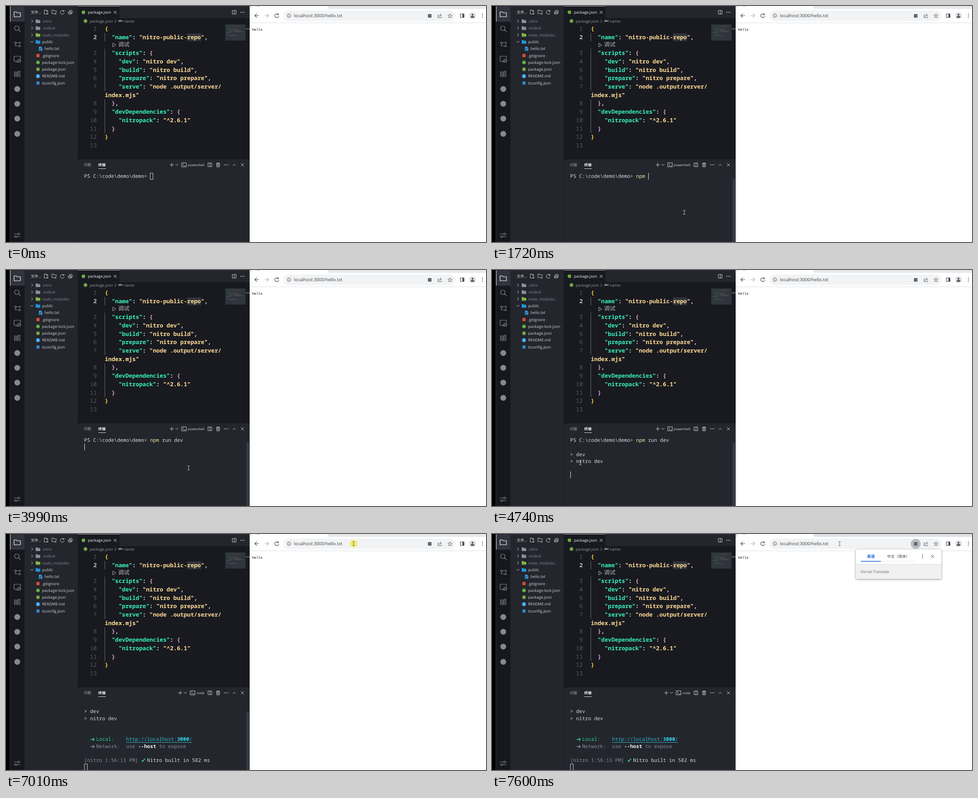
Recreate the animation shown at these times as an HTML page with a canvas. Size 1066 px wide and 526 px high, loop 8 s.

```html
<!DOCTYPE html>
<html lang="zh">
<head>
<meta charset="utf-8">
<title>Editor and browser</title>
<style>
html, body { margin: 0; width: 100%; height: 100%; overflow: hidden; background: #fff; }
canvas { display: block; width: 1066px; height: 526px; }
</style>
</head>
<body>
<canvas id="stage" width="1066" height="526"></canvas>
<script>
const g = document.getElementById('stage').getContext('2d');
g.textRendering = 'geometricPrecision';
g.lineCap = g.lineJoin = 'round';

const UI = '"Open Sans", "Noto Sans CJK SC", "Noto Sans CJK", sans-serif';
const MONO = '"Noto Sans Mono", "DejaVu Sans Mono", monospace';
const LOOP = 8000;
const CODE = 7.62, CELL = 6.66, ROW = 15.57;

// ---- drawing helpers; text is placed by its vertical centre ----
function text(s, x, y, size, color, { font = UI, weight = 400, align = 'left' } = {}) {
  g.font = `${weight} ${size}px ${font}`;
  g.textAlign = align;
  g.fillStyle = color;
  g.fillText(s, x, y + size * 0.35);
}
function rect(x, y, w, h, color, radius = 0) {
  g.fillStyle = color;
  g.beginPath();
  g.roundRect(x, y, w, h, radius);
  g.fill();
}
function disc(x, y, r, color) {
  g.fillStyle = color;
  g.beginPath();
  g.arc(x, y, r, 0, 7);
  g.fill();
}
function icon(d, x, y, color, width = 1, fill) {
  const path = new Path2D(d);
  g.save();
  g.translate(x, y);
  if (fill) { g.fillStyle = fill; g.fill(path); }
  if (color) { g.strokeStyle = color; g.lineWidth = width; g.stroke(path); }
  g.restore();
}
function dots(x, y, dx, dy, color) {
  for (const k of [-1, 0, 1]) disc(x + k * dx, y + k * dy, 1, color);
}

const I = {
  cross: 'M-3-3L3 3M3-3L-3 3',
  right: 'M-1.5-3L1.5 0L-1.5 3',
  down: 'M-3-1.5L0 1.5L3-1.5',
  up: 'M-3 1.5L0-1.5L3 1.5',
  plus: 'M-4 0H4M0-4V4',
  split: 'M-4-4H4V4H-4ZM0-4V4',
  folder: 'M-5-4H-1L0-2.5H5V4H-5Z',
  file: 'M-3.5-4.5H1.5L4-2V4.5H-3.5Z',
  search: 'M4-1.5A5 5 0 1 1-6-1.5A5 5 0 1 1 4-1.5M2.5 2L7 6.5',
  newFile: 'M4-1V-2L1-5H-4V4H0M1-5V-2H4M3 1V5M1 3H5',
  newFolder: 'M5-1V-3H0L-1-5H-5V3H0M3 1V5M1 3H5',
  reload: 'M3.5-2.5A4.3 4.3 0 1 0 4.3 1M3.8-5V-2H.8',
  collapse: 'M-4-1H2V4H-4ZM-2-1V-4H4V2H2M-2.5 1.5H.5',
  terminal: 'M-5-4.5H5V4.5H-5ZM-3-2.5L-.5 0L-3 2.5M.5 2.5H3',
  trash: 'M-4-3H4M-1.5-3V-4.5H1.5V-3M-3-3V4.5H3V-3M-1-1V2.5M1-1V2.5',
  share: 'M-2-2H-4V4H4V2M-2 2Q-1-2 3-2M1-4.5L4-2L1 .5',
  star: 'M0-4.5L1.4-1.5L4.6-1.2L2.1 1L2.9 4.2L0 2.5L-2.9 4.2L-2.1 1L-4.6-1.2L-1.4-1.5Z',
  arrow: 'M0 0V9.5L2.2 7.5L3.7 10.6L5.1 9.9L3.7 7H6.6Z',
  beam: 'M-2-4.5H-.7L0-4L.7-4.5H2M0-4V4M-2 4.5H-.7L0 4L.7 4.5H2'
};

// ---- editor ----
const codeRows = [
  [1, 51, 0, '{'],
  [2, 69.5, 2, '"name": "nitro-public-repo",'],
  [3, 105, 2, '"scripts": {'],
  [4, 123.7, 4, '"dev": "nitro dev",'],
  [5, 142.3, 4, '"build": "nitro build",'],
  [6, 161, 4, '"prepare": "nitro prepare",'],
  [7, 180, 4, '"serve": "node .output/server/'],
  ['', 198.5, 0, 'index.mjs"'],
  [8, 217, 2, '},'],
  [9, 236, 2, '"devDependencies": {'],
  [10, 254.7, 4, '"nitropack": "^2.6.1"'],
  [11, 273.3, 2, '}'],
  [12, 292, 0, '}'],
  [13, 311, 0, '']
];
function drawCode() {
  for (const [, y, indent, line] of codeRows) {
    for (const m of line.matchAll(/"[^"]*"?|index\S+|[{}]|[:,]/g)) {
      const s = m[0];
      const color = s === '{' || s === '}' ? (indent ? '#e3a3da' : '#ffcf33')
        : s.length < 2 ? '#dfe6e6'
        : line[m.index + s.length] === ':' ? '#38efc0' : '#ffdb94';
      text(s, 219.5 + (indent + m.index) * CODE, y, CODE / 0.6, color, { font: MONO, weight: 700 });
    }
  }
}
function drawEditor() {
  rect(160, 0, 381, 342, '#191a20');
  rect(252, 0, 289, 27, '#23262d');
  rect(160, 0, 92, 1, '#9da0a5');
  disc(172, 14, 4, '#6fa840');
  text('package.json', 182, 14, 8.5, '#fff');
  icon(I.cross, 242.5, 14, '#e4e4e6');
  icon(I.split, 507, 14, '#c9cbd0');
  dots(525, 14, 3.5, 0, '#c9cbd0');
  disc(176.5, 33.5, 4, '#6fa840');
  text('package.json', 186, 34, 8.5, '#989aa2');
  icon(I.right, 243, 34, '#989aa2');
  text('abc', 249, 33, 6, '#c9cbd0', { weight: 700 });
  text('name', 262, 34, 8.7, '#989aa2');

  rect(402, 61, 31, 17.5, '#30333d');
  for (const [top, bottom] of [[60, 79], [95, 189], [208, 283]])
    rect(219, top, 1, bottom - top, '#6a6d76');
  for (const [n, y] of codeRows)
    text(n, 201.5, y, CODE / 0.6, n === 2 ? '#c0c3c9' : '#555962', { font: MONO, weight: n === 2 ? 700 : 500, align: 'right' });
  icon('M-3-4L3.5 0L-3 4Z', 240.5, 87, '#b4b6bc');
  text('调试', 249, 86, 12.6, '#b4b6bc');
  drawCode();

  rect(487, 41, 45, 36, '#30343c');
  g.save();
  g.translate(458, 37);
  g.scale(0.145, 0.115);
  g.globalAlpha = 0.5;
  drawCode();
  g.restore();
  rect(533, 50.5, 8, 1, '#b9bbc0');
}

// ---- activity bar and file tree ----
const tree = [
  ['.nitro', 'folder', '#8c9099', 'closed'],
  ['.output', 'folder', '#8c9099', 'closed'],
  ['node_modules', 'folder', '#80b83e', 'closed'],
  ['public', 'folder', '#2196dd', 'open'],
  ['hello.txt', 'file', '#3d9fe0', 'child'],
  ['.gitignore', 'square', '#e2492c'],
  ['package-lock.json', 'disc', '#6fa840'],
  ['package.json', 'disc', '#6fa840'],
  ['README.md', 'info', '#35a0e8'],
  ['tsconfig.json', 'square', '#3189c9']
];
function drawSidebar() {
  rect(0, 0, 9, 526, '#000');
  rect(8, 0, 1, 526, '#2c2e33');
  rect(9, 0, 32, 526, '#17181d');
  rect(9, 1, 32, 34, '#31343e');
  rect(9, 1, 1, 34, '#d8dade');
  rect(41, 0, 119, 526, '#23262d');
  rect(159, 0, 1, 526, '#1b1d22');

  const c = '#858891';
  icon('M-7-5H-2L-.5-3H7V6H-7Z', 25, 18, '#fff', 1.2);
  icon(I.search, 25, 51, c, 1.2);
  icon('M-4-5A2 2 0 1 0-4-1A2 2 0 1 0-4-5M-4-1V4H1M5 2A2 2 0 1 0 5 6A2 2 0 1 0 5 2M-2-3H5M5-5A2 2 0 1 1 5-1', 25, 85, c, 1.2);
  icon('M0 5H-7V-6H7V-1M-3 7H1M8 4A3.5 3.5 0 1 1 1 4A3.5 3.5 0 1 1 8 4M3 4L4 5L6 3', 25, 118, c, 1.2);
  icon('M-6-4H0V6H-6ZM-6 1H6V6H0M2-6H6V-2H2ZM-4-1.5H-2M-4 3.5H-2M2 3.5H4', 25, 151, c, 1.2);
  for (const y of [185, 218, 251, 285]) disc(25, y, 6.5, c);
  icon('M-7-3H1M5-3H7M-7 3H-5M-1 3H7M5-3A2 2 0 1 1 1-3A2 2 0 1 1 5-3M-1 3A2 2 0 1 1-5 3A2 2 0 1 1-1 3', 25, 511, c, 1.2);

  text('文件...', 55, 14, 8.3, '#e2e3e6');
  [I.newFile, I.newFolder, I.reload, I.collapse].forEach((d, i) => icon(d, 89 + i * 18, 14, '#c9cbd0'));

  tree.forEach(([name, shape, color, kind], i) => {
    const y = 34 + i * 15.3, x = kind === 'child' ? 76.5 : 71;
    if (kind === 'closed') icon(I.right, 58, y, '#c9cbd0');
    if (kind === 'open') icon(I.down, 58, y, '#c9cbd0');
    if (I[shape]) icon(I[shape], x, y, null, 0, color);
    else if (shape === 'square') rect(x - 3.5, y - 3.5, 7, 7, color);
    else disc(x, y, shape === 'info' ? 4.5 : 4, color);
    if (shape === 'file') icon('M-2-1H2M-2 1H2M-2 3H1', x, y, '#23262d', 0.8);
    if (shape === 'info') text('i', x, y, 7, '#fff', { weight: 700, align: 'center' });
    text(name, x + 9, y, 8.7, i < 3 ? '#868992' : '#d2d4d8');
  });
}

// ---- terminal ----
const command = 'npm run dev';
const keyTimes = [1190, 1390, 1520, 1720, 1820, 1920, 2120, 2190, 2800, 2930, 3130];
const ENTER = 3390, STARTED = 4390, SERVING = 5220, RENAMED = 5360, BUILT = 6250;
const FOCUS = 790, BLUR = 7010, BROWSER_ACTIVE = 7060;

function drawTerminal(t) {
  const scroll = t >= BUILT ? 1 : 0;
  const colX = col => 173.5 + col * CELL;
  const rowY = row => 379.5 + (row - scroll) * ROW;
  const put = (row, col, s, color = '#d8dade', weight = 400) =>
    text(s, colX(col), rowY(row), CELL / 0.6, color, { font: MONO, weight });
  const glyph = (row, col, s, color) =>
    text(s, colX(col), rowY(row), 13.5, color, { font: '"DejaVu Sans", sans-serif' });

  rect(160, 342, 381, 184, '#23262d');
  text('问题', 173, 354.5, 8, '#a5a8b0');
  text('终端', 205, 354.5, 8, '#fff', { weight: 700 });
  rect(205, 362, 17, 1, '#d8dade');
  const renamed = t >= RENAMED, shift = renamed ? 19 : 0, c = '#c9cbd0';
  icon(I.plus, 368 + shift, 354, c);
  icon(I.down, 379.5 + shift, 354, c);
  icon(I.terminal, 395.5 + shift, 354, c);
  text(renamed ? 'node' : 'powershell', 440.5, 354.5, 7.2, '#d8dade', { align: 'right' });
  icon(I.split, 453, 354, c);
  icon(I.trash, 471, 354, c);
  dots(489, 354, 3.5, 0, c);
  icon(I.up, 507, 354, c);
  icon(I.cross, 525, 354, c);
  if (t >= 464 && t < BROWSER_ACTIVE) rect(534, 385 + scroll * 12, 6, 141, '#373a42');

  const typed = keyTimes.filter(k => t >= k).length;
  if (!scroll) {
    put(0, 0, 'PS C:\\code\\demo\\demo>');
    put(0, 22, command.slice(0, Math.min(typed, 3)), '#f7e6a3');
    put(0, 26, command.slice(4, Math.max(typed, 4)));
  }
  if (t >= STARTED) {
    put(2, 0, '> dev');
    put(3, 0, '> nitro dev');
  }
  if (t >= SERVING) {
    glyph(6, 2, '➜', '#2bcb8c');
    put(6, 4, 'Local:', '#2bcb8c');
    put(6, 14, 'http://localhost:', '#2fb9cb');
    put(6, 31, '3000', '#2fd5e8', 700);
    put(6, 35, '/', '#2fb9cb');
    rect(colX(14), Math.round(rowY(6) + 6.5), 22 * CELL, 1, '#2fb9cb');
    glyph(7, 2, '➜', '#858992');
    put(7, 4, 'Network:', '#858992');
    put(7, 14, 'use', '#858992');
    put(7, 18, '--host', '#f0f1f3', 700);
    put(7, 25, 'to expose', '#858992');
  }
  if (scroll) {
    put(9, 0, '[nitro 1:56:13 PM]', '#858992');
    glyph(9, 19, '✔', '#2bcb8c');
    put(9, 21, 'Nitro built in 582 ms');
  }

  const row = scroll ? 10 : t >= SERVING ? 9 : t >= STARTED ? 5 : t >= ENTER ? 1 : 0;
  const x = Math.round(colX(row ? 0 : 22 + typed)), y = Math.round(rowY(row) - 8);
  if (t >= FOCUS && t < BLUR) rect(x, y, 1, 15, '#e6e7ea');
  else {
    g.strokeStyle = '#d3d5d9';
    g.lineWidth = 1;
    g.strokeRect(x + 0.5, y + 0.5, 6, 14);
  }
}

// ---- browser ----
function drawBrowser(t) {
  const active = t >= BROWSER_ACTIVE;
  const strip = active ? '#dee1e6' : '#e7e9ec';
  rect(541, 0, 525, 526, '#fff');
  if (!active) {
    const shade = g.createLinearGradient(541, 0, 546, 0);
    shade.addColorStop(0, '#cfcfcf');
    shade.addColorStop(0.3, '#f1f1f1');
    shade.addColorStop(1, '#fff');
    rect(541, 0, 5, 526, shade);
  }
  rect(541, -6, 6, 12, strip, [0, 0, 5, 0]);
  rect(714, -6, 352, 12.5, strip, [0, 0, 0, 5]);
  rect(557, 0, 6, 1, '#a0a3a8', [0, 0, 3, 3]);
  rect(542, 37, 524, 1, '#dcdee1');

  const c = '#4b4e53';
  icon('M4.5 0H-4.5M-.5-4L-4.5 0L-.5 4', 557, 21.5, c, 1.2);
  icon('M-4.5 0H4.5M.5-4L4.5 0L.5 4', 579, 21.5, '#b4b7bb', 1.2);
  icon(I.reload, 601, 21.5, c, 1.2);
  rect(616.5, 10, 381.5, 23.5, '#f1f3f4', 12);
  icon('M4 0A4 4 0 1 1-4 0A4 4 0 1 1 4 0M0 0V2M0-2V-1.9', 628.5, 21.5, c);
  text('localhost:3000/hello.txt', 639.5, 21.5, 9.9, '#3f4247');

  const fade = Math.min(5, Math.max(0, Math.floor((t - 7260) / 67))) / 5;
  g.globalAlpha = fade;
  disc(941, 22, 11, '#b9bcc0');
  g.globalAlpha = 1;
  rect(937, 18, 8, 8, '#666a70');
  icon(I.share, 963.5, 22, '#5f6368');
  icon(I.star, 986, 22, '#5f6368');
  icon('M-4-4H4V4H-4Z', 1013, 21.5, c, 1.2);
  rect(1013.5, 17.5, 4, 8, c);
  disc(1036, 21.5, 7.5, '#d9dce1');
  disc(1036, 19.5, 2, '#41454c');
  rect(1032, 22.5, 8, 3.5, '#41454c', [3, 3, 0, 0]);
  dots(1058, 21.5, 0, 3.5, c);
  text('hello', 546.5, 52, 7.67, '#000', { font: '"Liberation Mono", monospace' });
  if (fade) drawPopup(fade);
}
function drawPopup(alpha) {
  g.save();
  g.globalAlpha = alpha;
  g.shadowColor = 'rgba(0,0,0,.45)';
  g.shadowBlur = 4;
  g.shadowOffsetY = 1;
  rect(808, 34.5, 190, 65.5, '#fff', 3);
  g.shadowColor = 'transparent';
  rect(808, 67.5, 190, 32.5, '#f1f1f1', [0, 0, 3, 3]);
  rect(808, 67, 190, 1, '#dedede');
  rect(819, 60, 122, 1, '#e8eaed');
  rect(819, 60, 44.5, 1.5, '#1a66d2');
  text('英语', 833, 50, 8.5, '#1a66d2', { weight: 700 });
  text('中文（简体）', 877.5, 50, 8.3, '#3c4043', { weight: 500 });
  dots(956, 50, 0, 3.5, '#4b4e53');
  icon(I.cross, 978.5, 50, '#3c4043');
  text('Dorvel Translate', 819, 84, 8.3, '#5f6368');
  g.restore();
}

// ---- mouse: [first change, last change, steps, x, y] ----
const moves = [
  [200, 530, 6, 427, 460],
  [3990, 4060, 2, 384, 422],
  [4390, 4740, 6, 196, 430],
  [4810, 5150, 6, 206, 446],
  [5890, 6040, 3, 683, 120],
  [6115, 6650, 8, 655, 20],
  [6720, 6790, 2, 772, 21.5]
];
function drawMouse(t) {
  if (t < 200) return;
  let x = 898, y = 490;
  for (const [start, end, steps, toX, toY] of moves) {
    if (t < start) break;
    const k = Math.min(steps, 1 + Math.floor((t - start) / (end - start) * (steps - 1) + 1e-6)) / steps;
    x += (toX - x) * k;
    y += (toY - y) * k;
  }
  const clicking = (t >= FOCUS && t < 990) || (t >= BLUR && t < 7260);
  if (clicking) disc(x, y, 8.5, 'rgba(245,232,50,.65)');
  if (x < 541) icon(I.beam, x, y, '#d8dade', 0.9);
  else if (y < 34) icon(I.beam, x, y, '#4b4e53', 0.9);
  else icon(I.arrow, x, y, '#33363a', 0.9, '#fff');
}

function frame(now) {
  const t = now % LOOP;
  drawEditor();
  drawTerminal(t);
  drawSidebar();
  drawBrowser(t);
  drawMouse(t);
  requestAnimationFrame(frame);
}
requestAnimationFrame(frame);
</script>
</body>
</html>
```
